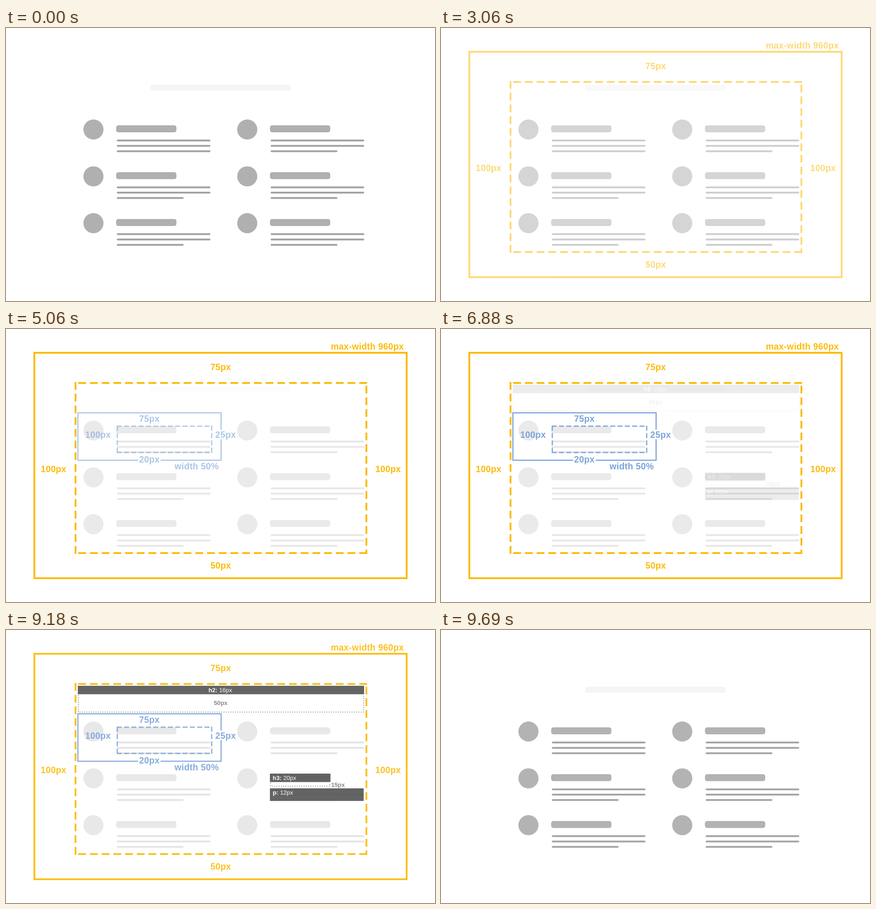
Recreate the animation shown at these times as an HTML page. Size 938 px wide and 597 px high, loop 9810 ms.

```html
<!DOCTYPE html>
<html lang="en">
<head>
<meta charset="utf-8">
<title>Layout spacing</title>
<style>
  html, body { margin: 0; width: 100%; height: 100%; overflow: hidden; background: #fff; }
  svg { display: block; width: 938px; height: 597px; }
  text { font-family: "Liberation Sans", Arial, sans-serif; }
  .label { font-size: 19.3px; font-weight: 700; letter-spacing: .3px; }
  .small { font-size: 13.1px; }
  .b { font-weight: 700; }
  #outer { --c: #fbbc0b; }
  #item { --c: #7ba4da; }
  #outer text, #item text { fill: var(--c); }
  #outer path, #item path { fill: none; stroke: var(--c); }
  #outer path { stroke-width: 4; }
  #item path { stroke-width: 2.5; }
  #type rect { fill: #545454; }
  #type path { fill: none; stroke: #a3a3a3; stroke-width: 2.4; stroke-linecap: round; stroke-dasharray: 0 5; }
  #type .white { fill: #fff; }
  #type .gray { fill: #7c7c7c; }
  #wire .line { stroke: #a2a2a2; stroke-width: 4; stroke-linecap: round; }
  #wire .title { fill: #b0b0b0; stroke: #a3a3a3; }
  #wire circle { fill: #b0b0b0; }
</style>
</head>
<body>
<svg viewBox="0 0 938 597">
  <g id="wire">
    <rect x="315.5" y="124" width="307" height="13.5" rx="4" fill="#f5f5f5"/>
  </g>
  <g id="outer">
    <path d="M62 52H876V545H62Z"/>
    <g stroke-dasharray="17 8.6">
      <path d="M158 118H790"/>
      <path d="M158 490H790"/>
      <path d="M152 116V492"/>
      <path d="M788 124V492"/>
    </g>
    <g class="label">
      <text x="870" y="45" text-anchor="end">max-width 960px</text>
      <g text-anchor="middle">
        <text x="469.5" y="90">75px</text>
        <text x="469.5" y="524">50px</text>
        <text x="104" y="312.5">100px</text>
        <text x="835.5" y="312.5">100px</text>
      </g>
    </g>
  </g>
  <g id="item">
    <path d="M289 287H157.2V183.2H470.3V220M470.3 241V287H338"/>
    <g stroke-dasharray="11 5">
      <path d="M242 212.5H451"/>
      <path d="M242 270H451"/>
      <path d="M243.3 211.5V271"/>
      <path d="M449.8 211.5V271"/>
    </g>
    <g class="label" text-anchor="middle">
      <text x="313.5" y="203">75px</text>
      <text x="201.3" y="237.5">100px</text>
      <text x="480.2" y="237.5">25px</text>
      <text x="313.5" y="292">20px</text>
      <text x="417" y="306.5">width 50%</text>
    </g>
  </g>
  <g id="type">
    <path d="M158.3 143V179.5H782V143"/>
    <path d="M578.5 335V341.5H708.5V335"/>
    <rect x="157" y="122" width="626" height="18.5"/>
    <rect x="577" y="314" width="132.5" height="18.5"/>
    <rect x="577" y="346.3" width="205" height="27.5"/>
    <g class="small white">
      <text x="468.5" y="136" text-anchor="middle"><tspan class="b">h2:</tspan> 16px</text>
      <text x="583" y="328"><tspan class="b">h3:</tspan> 20px</text>
      <text x="583.3" y="360"><tspan class="b">p:</tspan> 12px</text>
    </g>
    <g class="small gray b">
      <text x="469.5" y="164" text-anchor="middle">50px</text>
      <text x="711" y="343">15px</text>
    </g>
  </g>
</svg>
<script>
const LOOP = 9810, STEP = 30;
const FADE_IN = 2910, FADE_OUT = 9180;
const [wire, outer, item, type] = ['wire', 'outer', 'item', 'type'].map(id => document.getElementById(id));

function add(name, attrs) {
  const el = document.createElementNS('http://www.w3.org/2000/svg', name);
  for (const key in attrs) el.setAttribute(key, attrs[key]);
  wire.append(el);
}

function addBlock(col, row) {
  const x = col * 336.3, y = row * 102.4;
  add('circle', { cx: 191.2 + x, cy: 222 + y, r: 22 });
  add('rect', { class: 'title', x: 241.5 + x, y: 213.5 + y, width: 130.5, height: 14, rx: 4 });
  for (let i = 0; i < 3; i++) {
    const full = i < 2 || (!col && !row);
    const ly = 246 + y + i * 11.7;
    add('line', { class: 'line', x1: 244.3 + x, x2: (full ? 445 : 386.3) + x, y1: ly, y2: ly });
  }
}

for (let row = 0; row < 3; row++) {
  addBlock(0, row);
  addBlock(1, row);
}

// Stepped ramp: n equal rises, the first one at the start time.
function ramp(t, start, n) {
  return Math.max(0, Math.min(n, Math.floor((t - start) / STEP) + 1)) / n;
}

function wireLevel(t) {
  if (t < 2790) return 1;
  if (t < FADE_OUT) return 0.85 - 0.6 * ramp(t, FADE_IN, 11);
  if (t < 9570) return 0.25 + 0.31 * ramp(t, FADE_OUT, 10);
  return t < 9690 ? 0.76 : 0.96;
}

function draw(t) {
  const out = 1 - ramp(t, FADE_OUT, 10);
  wire.style.opacity = wireLevel(t);
  outer.style.opacity = ramp(t, FADE_IN, 11) * out;
  item.style.opacity = ramp(t, 4940, 8) * out;
  type.style.opacity = ramp(t, 6880, 10) * out;
}

const begin = performance.now();
function tick() {
  draw((performance.now() - begin) % LOOP);
  requestAnimationFrame(tick);
}
tick();
</script>
</body>
</html>
```
